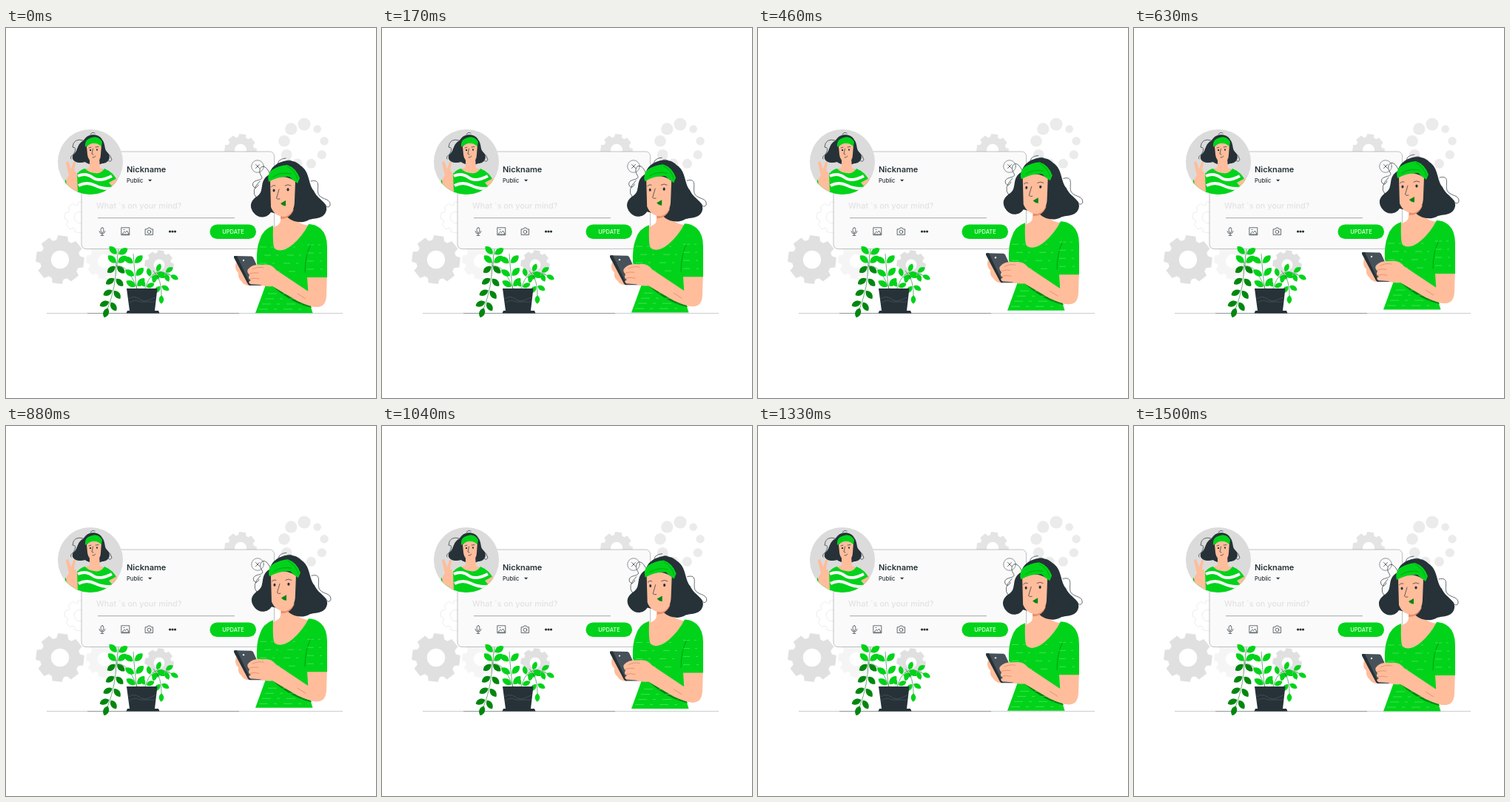
These frames come from a looping animation (500x500 px, 1540 ms). An HTML page:

```html
<!DOCTYPE html>
<html lang="en">
<head>
<meta charset="utf-8">
<style>
html, body { margin: 0; width: 100%; height: 100%; overflow: hidden; background: #fff }
svg { display: block; width: 100vw; height: 100vh }
text { font-family: Inter, Roboto, sans-serif; fill: #263238 }
.green { fill: #00d31a } .ink { fill: #263238 } .skin { fill: #ffbd9c } .dark { fill: #00870f }
.line { fill: none; stroke: #263238; stroke-width: .7; stroke-linecap: round; stroke-linejoin: round }
.stem { fill: none; stroke: #17752a; stroke-width: .6 }
</style>
</head>
<body>
<svg viewBox="0 0 500 500">
  <defs><clipPath id="disc"><circle cx="114" cy="181" r="44"/></clipPath></defs>
  <g id="back"></g>
  <path d="M55 385.500H455" stroke="#b4b7b9" stroke-width=".7"/>
  <path d="M110 385.500H315" stroke="#777e82" stroke-width=".7"/>

  <!-- post card -->
  <rect x="102" y="167" width="260.500" height="131.500" rx="6" fill="#fafafa" stroke="#a3a8aa" stroke-width=".7"/>
  <text x="163" y="194.500" font-size="11" font-weight="600">Nickname</text>
  <text x="163" y="208.500" font-size="7.600" font-weight="500">Public</text>
  <path class="ink" d="M192 204.800H197.200L194.600 207.400Z"/>
  <text x="122" y="243.500" font-size="10.800" font-weight="500" style="fill:#e2e2e2">What `s on your mind?</text>
  <path d="M124 256.700H309" stroke="#8b9194" stroke-width=".8"/>
  <g class="line">
    <rect x="128.200" y="269.800" width="3.600" height="6.600" rx="1.800"/>
    <path d="M126 274.500Q126.500 278 130 278T134 274.500M130 278V280.300M128 280.300H132"/>
    <rect x="156.200" y="269.800" width="10.600" height="10"/>
    <path d="M157 278.500L160 275L161.500 276.500L163.500 274L166 278.500ZM159 272.500H160"/>
    <path d="M188.500 271.800H191L192 270H195L196 271.800H198.500V279.500H188.500Z"/>
    <circle cx="193.500" cy="275.500" r="2.300"/>
    <path d="M221.500 275h.01m3.500 0h.01m3.500 0h.01" style="stroke-width:3.200"/>
    <circle cx="340" cy="187" r="8.300" style="stroke-width:.5"/>
    <path d="M337.500 184.500l5 5m0-5l-5 5"/>
  </g>
  <rect class="green" x="275.500" y="265.500" width="62.500" height="19.500" rx="9.750"/>
  <text x="307" y="278" font-size="7.500" font-weight="500" text-anchor="middle" style="fill:#e6ffe8">UPDATE</text>

  <!-- avatar -->
  <circle cx="114" cy="181" r="44" fill="#dbdbdb"/>
  <g clip-path="url(#disc)">
    <path class="ink" d="M105 152C111 141 126 143 130 151C135 157 132 164 137 168C143 174 139 183 130 183C121 187 110 184 107 181C93 185 87 177 91 171C98 166 95 157 105 152Z"/>
    <path class="skin" d="M113 176H126L127 189L139 194L125 203L106 191L113 188Z"/>
    <path class="green" d="M107 190Q101 191 96 197L95 214L80 205L78 226H152L151 208Q146 195 133 190Q128 198 119 196Q111 195 107 190Z"/>
    <path d="M97 200Q108 195 117 202T143 200M98 213Q109 207 121 213T148 216" fill="none" stroke="#fff" stroke-width="4"/>
    <path class="skin" d="M96 197L97 222L82 213L81 205L85 199L81 182Q83 178 85 182L88 191L91 181Q94 179 94 183L92 193Q98 196 95 203ZM139 209L150 203L154 211L146 217Z"/>
    <path class="skin" d="M109 160Q119 150 129 158L128 171Q128 181 120 182Q111 181 110 171Z"/>
    <path class="green" d="M107 161Q106 153 111 150Q124 143 130 154L129 160Q119 151 107 161Z"/>
    <path class="line" d="M112 162l3-1M121 161l4-.5M117.500 163L116 170L118 171M117 175Q119 176 121 173"/>
    <path class="ink" d="M113 164h2v2h-2zM122 163.500h2v2h-2z"/>
  </g>
  <path class="line" d="M105 152Q91 148 90 161Q97 161 91 171Q86 174 88 177M114 144Q116 140 120 142M136 168Q142 172 143 178Q141 182 138 179"/>

  <!-- plant -->
  <g id="plant"></g>
  <path class="ink" d="M163 352H204.500L201 382H206L207.500 385.500H162.500L164 382H167Z"/>
  <path d="M166 366q7-5 14 0t14 1l8-3M167 371q7-5 14-1h20" fill="none" stroke="#5b676d" stroke-width=".5"/>

  <!-- woman -->
  <g id="body">
    <path class="skin" d="M371 244L392 241L393 260Q398 266 411 267L403 305H361L359 270Q371 267 371 260Z"/>
    <path class="skin" d="M403 329H434L433 362Q432 378 419 377Q410 377 400 370L407 355Z"/>
    <path class="green" d="M361 267Q347 272 343 286Q338 298 339 318L351 347L337 385.400H414.500L409 368L407 337H434V296Q434 279 425 271Q418 265 409 265Q401 281 387 293Q372 305 363 298Q360 294 361 267Z"/>
    <path class="dark" d="M360 349L404 361L413 378Q386 372 360 349Z"/>
    <path class="line" d="M404 330Q404 307 412 292" style="stroke:#00870f"/>
    <g id="weave" fill="none" stroke="#7ff08a" stroke-width=".5"></g>
    <path class="skin" d="M311 317Q308 326 314 331Q313 338 318 342Q322 349 331 348V325Z"/>
    <path d="M309.500 308L332 308.500L334 310L350 345Q350 348 347 348H331Q328 348 327 346L308.500 311Q307 308 309.500 308Z" fill="#465159"/>
    <path class="ink" d="M308.500 311Q307 308 309.500 308H312L331 348Q328 348 327 346Z"/>
    <circle cx="321" cy="314" r="1.200" fill="#e3e6e8"/>
    <path class="skin" d="M328 325Q333 319 347 320Q358 318 365 327L407 355L428 361Q432 376 420 377Q411 377 394 369L360 349Q350 350 343 347L330 346Q326 343 331 341Q326 338 329 334Q324 328 328 325Z"/>
    <path class="line" d="M329 332q6-2 12-1M330 339q6-2 12 0M333 326q8-4 15-2M394 359l11 7" style="stroke:#d97851;stroke-width:.6"/>
  </g>
  <g id="head">
    <path class="ink" d="M356 198C358 182 385 172 398 186C411 194 408 211 416 220C421 232 435 235 433 246C430 260 414 256 408 260C396 266 382 259 379 254L358 249C352 258 340 257 335 250C327 240 332 232 340 227C350 220 341 206 356 198Z"/>
    <path class="line" d="M357 198C349 178 338 190 345 200C350 208 330 203 334 214Q338 219 341 212M343 207Q330 220 338 229M367 188Q365 177 378 176M386 180Q380 176 375 184M412 207C428 203 418 219 423 226C429 233 439 230 438 240Q434 245 431 238"/>
    <path d="M371 250L389 245Q384 258 371 258Z" fill="#e98e6a"/>
    <path class="skin" d="M357 206Q374 196 391 207L390 233Q390 251 377 255Q363 255 358 242Z"/>
    <path class="green" d="M355 208Q352 198 359 192Q368 186 380 185Q392 189 397 203L394 210Q387 205 383 201Q369 200 355 208Z"/>
    <path class="line" d="M361 201Q372 194 385 197M380 187Q391 193 394 204" style="stroke:#00870f;stroke-width:.6"/>
    <path class="line" d="M358.500 214.500Q361 211.500 364 213M377 213Q381 210.500 385 213M369 218L365.500 230Q367 232 370 231"/>
    <ellipse class="ink" cx="362" cy="219.500" rx="1.500" ry="2"/>
    <ellipse class="ink" cx="381" cy="218.500" rx="1.600" ry="2.100"/>
    <path class="dark" d="M371 237L378 233V240.500Q374 240.500 371 237Z"/>
  </g>
</svg>
<script>
const $ = id => document.getElementById(id);
const add = (parent, tag, attrs) => {
  const el = document.createElementNS('http://www.w3.org/2000/svg', tag);
  for (const key in attrs) el.setAttribute(key, attrs[key]);
  $(parent).append(el);
};
const polar = (x, y, r, a) => [x + r * Math.cos(a), y + r * Math.sin(a)];

// Background gears and the ring of shrinking dots
function gear(x, y, r, fill, stroke = 'none') {
  const points = [], hole = r * .37;
  for (let i = 0; i < 8; i++)
    for (const [step, k] of [[-.3, .82], [-.2, 1], [.2, 1], [.3, .82]])
      points.push(polar(x, y, r * k, i * Math.PI / 4 + step + .12).join(' '));
  const ring = `M${x - hole} ${y}a${hole} ${hole} 0 1 0 ${2 * hole} 0a${hole} ${hole} 0 1 0 ${-2 * hole} 0`;
  add('back', 'path', { d: `M${points.join('L')}Z${ring}`, fill, stroke, 'fill-rule': 'evenodd', 'stroke-width': .7 });
}
gear(73, 313, 33, '#e0e0e0');
gear(317, 165, 22, '#e4e4e4');
gear(100, 256, 21, 'none', '#e6e6e6');
gear(133, 315, 25, '#f5f5f5');
gear(207, 320, 20, '#e0e0e0');
for (let i = 0; i < 9; i++) {
  const [cx, cy] = polar(403, 157.5, 27.5, -Math.PI / 2 - i * Math.PI * 2 / 9);
  add('back', 'circle', { cx, cy, r: 8.6 - i * .42, fill: '#ebebeb' });
}

// A quadratic stem carrying evenly spaced pairs of leaves
function stem(color, [x0, y0], [x1, y1], [x2, y2], pairs, tip, size = 1) {
  const mix = (a, b, c, t) => (1 - t) ** 2 * a + 2 * t * (1 - t) * b + t * t * c;
  const leaf = (t, turn) => {
    const dx = (1 - t) * (x1 - x0) + t * (x2 - x1), dy = (1 - t) * (y1 - y0) + t * (y2 - y1);
    const angle = Math.atan2(dy, dx) * 180 / Math.PI + turn;
    add('plant', 'path', {
      class: color, d: 'M2 0C6-6 14-6 18 0C14 6 6 6 2 0',
      transform: `translate(${mix(x0, x1, x2, t)} ${mix(y0, y1, y2, t)})rotate(${angle})scale(${size})`
    });
  };
  add('plant', 'path', { class: 'stem', d: `M${x0} ${y0}Q${x1} ${y1} ${x2} ${y2}` });
  for (let i = 0; i < pairs; i++) for (const turn of [-50, 50]) leaf((i + .3) / pairs, turn);
  if (tip) leaf(.95, 0);
}
stem('stem', [178, 354], [164, 318], [149, 322], 0);
stem('dark', [149, 316], [149, 350], [137, 380], 4, true, .85);
stem('green', [150, 322], [150, 310], [152, 299], 2, false, .9);
stem('green', [177, 354], [174, 336], [172, 305], 3, false, .9);
stem('green', [187, 356], [196, 318], [224, 335], 4, true, .72);
stem('green', [199, 328], [211, 340], [210, 362], 2, true, .72);

// Broken threads across the shirt
for (let i = 0; i < 4; i++) {
  const y = 296 + i * 11;
  add('weave', 'path', { d: `M${343 + i % 2 * 6} ${y}H400M407 ${y - 3}H433`, 'stroke-dasharray': `9 ${6 + i} 3 12` });
  add('weave', 'path', { d: `M${354 - i * 4} ${359 + i * 7}H${382 + i * 9}`, 'stroke-dasharray': '12 8 4 9' });
}

// One breath per loop, highest at PEAK
const LOOP = 1540, PEAK = 735, RISE = 5.2, SWAY = 1;
function draw(now) {
  const breath = (1 + Math.cos((now - PEAK) / LOOP * 2 * Math.PI)) / 2;
  $('body').setAttribute('transform', `translate(0 ${-RISE * breath})`);
  $('head').setAttribute('transform', `translate(${SWAY * breath} ${-RISE * breath})`);
  requestAnimationFrame(draw);
}
draw(performance.now());
</script>
</body>
</html>
```
